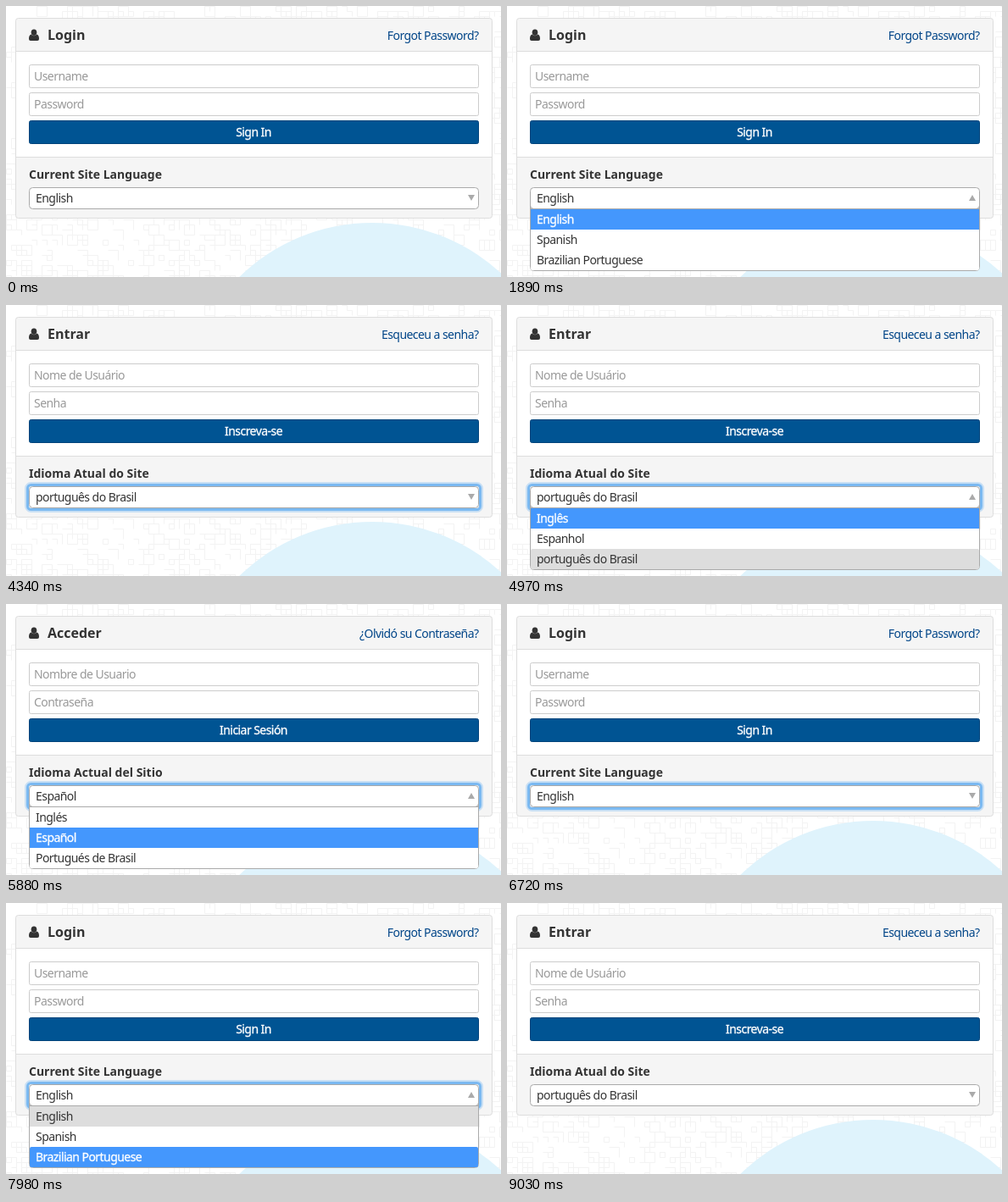
Animation of 584x320 px, one loop 9.1 s. Source, as an HTML page:

```html
<!DOCTYPE html>
<html lang="en">
<head>
<meta charset="utf-8">
<title>Login language switch</title>
<style>
html, body { margin: 0; width: 100%; height: 100%; overflow: hidden; background: #fff; }
svg { display: block; }
text { font: 14px "Noto Sans", "Open Sans", sans-serif; letter-spacing: -.55px; fill: #333; white-space: pre; }
.bold { font-weight: bold; letter-spacing: 0; }
.title { font-size: 16px; }
.link { fill: #004588; text-anchor: end; }
.hint { fill: #999; }
.white { fill: #fff; stroke: #fff; stroke-width: .3px; }
.mid { text-anchor: middle; }
.field { fill: #fff; stroke: #ccc; }
.box { fill: #fff; stroke: #aaa; }
.line { stroke: #ddd; }
</style>
</head>
<body>
<svg width="584" height="320" viewBox="0 0 584 320">
  <path id="pattern" fill="none" stroke="#f3f3f3"/>
  <circle cx="432" cy="480" r="224" fill="#dff3fc"/>

  <rect x="11.5" y="14.5" width="562" height="236" rx="3" fill="#f5f5f5" stroke="#ddd"/>
  <rect x="12" y="54" width="561" height="124" fill="#fff"/>
  <path class="line" d="M12 53.5H573M12 178.5H573"/>

  <g fill="#333">
    <ellipse cx="33" cy="31.3" rx="3.3" ry="3.7"/>
    <path d="M29.6 33.6C27.6 34 27 36.500 27 39Q27 41 29 41H37Q39 41 39 39C39 36.500 38.400 34 36.400 33.600Q33 36.800 29.600 33.600Z"/>
  </g>
  <text id="title" class="bold title" x="49" y="40"/>
  <text id="forgot" class="link" x="557.5" y="40"/>

  <rect class="field" x="27.500" y="69.500" width="530" height="27" rx="2"/>
  <rect class="field" x="27.500" y="102.500" width="530" height="27" rx="2"/>
  <rect x="27.500" y="135.500" width="530" height="27" rx="2" fill="#005493" stroke="#00437a"/>
  <text id="user" class="hint" x="33" y="88"/>
  <text id="pass" class="hint" x="33" y="121"/>
  <text id="signIn" class="white mid" x="292" y="154"/>
  <text id="label" class="bold" x="27" y="204"/>

  <g id="ring" fill="none" stroke="#62adf0">
    <rect x="24.500" y="211.500" width="536" height="31" rx="5" stroke-width="5" opacity=".3"/>
    <rect x="25.500" y="212.500" width="534" height="29" rx="4" stroke-width="3" opacity=".75"/>
  </g>
  <rect class="box" x="27.500" y="214.500" width="530" height="25" rx="4"/>
  <text id="value" x="35" y="232"/>
  <path id="arrow" fill="#aaa"/>

  <g id="menu">
    <path class="box" d="M27.500 239.500H557.500V308.500Q557.500 312.500 553.500 312.500H31.500Q27.500 312.500 27.500 308.500Z"/>
    <path d="M27.500 232V240M557.500 232V240" stroke="#aaa"/>
    <rect class="row" x="28" y="240" width="529" height="24"/>
    <rect class="row" x="28" y="264" width="529" height="24"/>
    <rect class="row" x="28" y="288" width="529" height="24" rx="2"/>
    <text class="item" x="35" y="257"/>
    <text class="item" x="35" y="281"/>
    <text class="item" x="35" y="305"/>
  </g>
</svg>
<script>
const LOOP = 9100, EN = 0, ES = 1, PT = 2, SHUT = -1;

const pages = [
  { title: 'Login', forgot: 'Forgot Password?', user: 'Username', pass: 'Password',
    signIn: 'Sign In', label: 'Current Site Language',
    items: ['English', 'Spanish', 'Brazilian Portuguese'] },
  { title: 'Acceder', forgot: '¿Olvidó su Contraseña?', user: 'Nombre de Usuario', pass: 'Contraseña',
    signIn: 'Iniciar Sesión', label: 'Idioma Actual del Sitio',
    items: ['Inglés', 'Español', 'Portugués de Brasil'] },
  { title: 'Entrar', forgot: 'Esqueceu a senha?', user: 'Nome de Usuário', pass: 'Senha',
    signIn: 'Inscreva-se', label: 'Idioma Atual do Site',
    items: ['Inglês', 'Espanhol', 'português do Brasil'] }
];

// start time, page language, selected item, hovered item, focus ring
const steps = [
  [0, EN, EN, SHUT, 0], [770, EN, EN, SHUT, 1], [1330, EN, EN, SHUT, 0],
  [1890, EN, EN, EN, 0], [2310, EN, EN, ES, 0], [2660, ES, ES, SHUT, 1],
  [3430, ES, ES, ES, 1], [3920, ES, ES, PT, 1], [4200, ES, PT, SHUT, 1],
  [4340, PT, PT, SHUT, 1], [4830, PT, PT, PT, 1], [4970, PT, PT, EN, 1],
  [5180, PT, PT, ES, 1], [5390, PT, ES, SHUT, 1], [5530, ES, ES, SHUT, 1],
  [5880, ES, ES, ES, 1], [6090, ES, ES, EN, 1], [6580, ES, EN, SHUT, 1],
  [6720, EN, EN, SHUT, 1], [7070, EN, EN, EN, 1], [7420, EN, EN, ES, 1],
  [7560, EN, EN, PT, 1], [7770, EN, EN, ES, 1], [7910, EN, EN, PT, 1],
  [8120, EN, PT, SHUT, 1], [8260, PT, PT, SHUT, 1], [9030, PT, PT, SHUT, 0]
];

const $ = id => document.getElementById(id);
const rows = document.querySelectorAll('.row');
const items = document.querySelectorAll('.item');
const show = (id, on) => $(id).setAttribute('visibility', on ? 'visible' : 'hidden');

// Faint background of scattered square outlines
let seed = 7;
const rnd = n => (seed = seed * 16807 % 2147483647) % n;
let d = '';
for (let i = 0; i < 1100; i++) {
  const x = rnd(98) * 6 + .5, y = rnd(54) * 6 + .5, s = 6 + rnd(2) * 6;
  d += `M${x} ${y}h${s}v${s}` + (rnd(2) ? `h${-s}z` : '');
}
$('pattern').setAttribute('d', d);

function draw([, lang, sel, hover, ring]) {
  const page = pages[lang], open = hover !== SHUT;
  for (const id of ['title', 'forgot', 'user', 'pass', 'signIn', 'label']) $(id).textContent = page[id];
  $('value').textContent = page.items[sel];
  $('arrow').setAttribute('d', open ? 'M545 230H553L549 223Z' : 'M545 223H553L549 230Z');
  show('ring', ring);
  show('menu', open);
  page.items.forEach((name, i) => {
    rows[i].setAttribute('fill', i === hover ? '#4497fd' : i === sel ? '#ddd' : '#fff');
    items[i].textContent = name;
    items[i].classList.toggle('white', i === hover);
  });
}

let current;
function tick() {
  const t = performance.now() % LOOP;
  const step = steps.findLast(s => s[0] <= t);
  if (step !== current) draw(current = step);
  requestAnimationFrame(tick);
}
tick();
</script>
</body>
</html>
```
